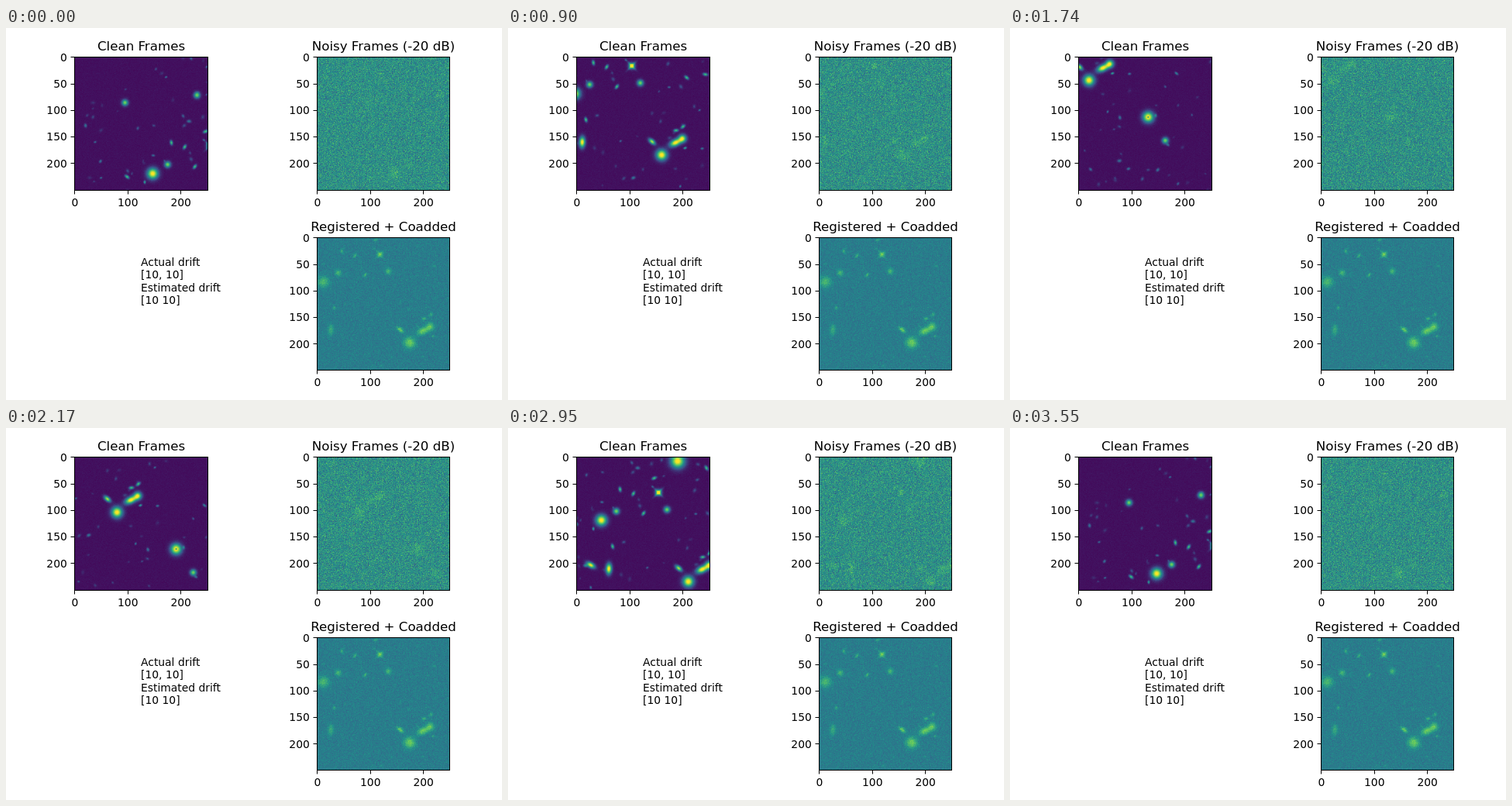
An HTML page with a canvas for the animation above (3.61 s loop, 640 by 480 pixels).

```html
<!DOCTYPE html>
<html lang="en">
<head>
<meta charset="utf-8">
<title>Drift registration</title>
<style>
  html, body { margin: 0; width: 100%; height: 100%; overflow: hidden; background: #fff; }
  canvas { display: block; }
</style>
</head>
<body>
<canvas id="stage" width="640" height="480"></canvas>
<script>
const ctx = document.getElementById('stage').getContext('2d');
const VIEW = 250, DRIFT = 10, STEPS = 30, WORLD = VIEW + DRIFT * (STEPS - 1);
const STEP_MS = 60, TURN_MS = 1810, LOOP_MS = 3610;

// Viridis as a 256-entry lookup table
const stops = ['#440154', '#3b528b', '#21918c', '#5ec962', '#fde725'];
const ramp = document.createElement('canvas').getContext('2d');
const gradient = ramp.createLinearGradient(0, 0, 256, 0);
stops.forEach((color, i) => gradient.addColorStop(i / 4, color));
ramp.fillStyle = gradient;
ramp.fillRect(0, 0, 256, 1);
const palette = ramp.getImageData(0, 0, 256, 1).data;

function seeded(seed) {
  let s = seed * 7919;
  return () => {
    s = s + 0x6D2B79F5 | 0;
    let t = Math.imul(s ^ s >>> 15, 1 | s);
    t = t + Math.imul(t ^ t >>> 7, 61 | t) ^ t;
    return ((t ^ t >>> 14) >>> 0) / 2 ** 32;
  };
}
const gauss = rnd => (rnd() + rnd() + rnd() - 1.5) * 2;

// Sky brightness over the whole area the camera drifts across
const sky = new Float32Array(WORLD * WORLD);

function blob(cx, cy, long, short, degrees, amp) {
  const a = degrees * Math.PI / 180, c = Math.cos(a), s = Math.sin(a), reach = Math.ceil(long * 3);
  for (let y = Math.max(0, cy - reach); y <= Math.min(WORLD - 1, cy + reach); y++)
    for (let x = Math.max(0, cx - reach); x <= Math.min(WORLD - 1, cx + reach); x++) {
      const dx = x - cx, dy = y - cy;
      const u = (dx * c + dy * s) / long, v = (dy * c - dx * s) / short;
      sky[y * WORLD + x] += amp * Math.exp(-(u * u + v * v) / 2);
    }
}

// x, y, radius and, for long galaxies, the tilt in degrees
const galaxies = [
  [146, 218, 7], [94, 85, 4], [229, 71, 4], [206, 168, 3], [131, 234, 2],
  [174, 201, 4], [181, 160, 3], [225, 205, 3], [245, 139, 3], [98, 224, 3],
  [289, 107, 9], [253, 166, 4], [269, 198, 4], [343, 120, 3], [167, 267, 3],
  [126, 302, 6, 30], [160, 309, 7, 92], [291, 308, 5, 40], [309, 333, 7],
  [335, 310, 8, -25], [348, 302, 5], [336, 287, 3], [349, 280, 3],
  [391, 182, 3], [356, 188, 3], [353, 320, 2], [420, 402, 7], [452, 446, 4]
];
for (const [x, y, r, tilt] of galaxies) {
  const round = r > 3 && tilt === undefined;
  blob(x, y, r, round ? r : r / 2 + 0.3, tilt ?? y * 5, Math.min(1, 0.35 + r / 10));
}
// Diffraction spikes of the bright star
for (const angle of [45, -45]) blob(253, 166, 7, 1.5, angle, 0.35);
// Saturated core
blob(420, 402, 1, 1, 0, -0.6);

const scatter = seeded(5);
for (let i = 0; i < 180; i++) {
  const r = 1 + scatter();
  blob(Math.floor(scatter() * WORLD), Math.floor(scatter() * WORLD),
    r * 1.4, r, scatter() * 180, 0.08 + 0.3 * scatter() ** 2);
}
const grainRnd = seeded(3);
const grain = sky.map(() => 0.045 + 0.013 * gauss(grainRnd));

const tile = document.createElement('canvas');
tile.width = tile.height = VIEW;
const tileCtx = tile.getContext('2d');
const pixels = tileCtx.createImageData(VIEW, VIEW);

function drawSky(box, offset, valueAt) {
  for (let y = 0, p = 0; y < VIEW; y++)
    for (let x = 0; x < VIEW; x++, p += 4) {
      const wx = x + offset, wy = y + offset, v = valueAt(wy * WORLD + wx, wx, wy);
      const q = 4 * Math.max(0, Math.min(255, Math.round(v * 255)));
      for (let j = 0; j < 4; j++) pixels.data[p + j] = palette[q + j];
    }
  tileCtx.putImageData(pixels, 0, 0);
  ctx.drawImage(tile, box.x, box.y, box.w, box.h);
  ctx.strokeRect(box.x, box.y, box.w, box.h);
}

function text(str, x, y, align = 'left', size = 13.89) {
  ctx.font = `${size}px "DejaVu Sans", sans-serif`;
  ctx.textAlign = align;
  ctx.fillText(str, x, y);
}

function line(x1, y1, x2, y2) {
  ctx.beginPath();
  ctx.moveTo(x1, y1);
  ctx.lineTo(x2, y2);
  ctx.stroke();
}

function drawAxes({ x, y, w, h, title }) {
  const bottom = y + h, snap = v => Math.floor(v) + 0.5;
  text(title, x + w / 2, y - 8.5, 'center', 16.67);
  for (let v = 0; v <= 200; v += 50) {
    const ty = y + 0.34 + v * 0.684;
    line(x - 5, snap(ty), x, snap(ty));
    text(v, x - 9.7, Math.round(ty + 5), 'right');
    if (v % 100) continue;
    const tx = x + 0.34 + v * 0.684;
    line(snap(tx), bottom, snap(tx), bottom + 5);
    text(v, tx, bottom + 20.5, 'center');
  }
}

const clean = { x: 88.5, y: 37.5, w: 172, h: 172, title: 'Clean Frames' };
const noisy = { ...clean, x: 401.5, w: 171, title: 'Noisy Frames (-20 dB)' };
const coadded = { ...noisy, y: 270.5, h: 171, title: 'Registered + Coadded' };

// Share of the steps in which a point lies inside the moving view
function coverage(x, y) {
  const first = Math.max(0, (Math.max(x, y) - VIEW) / DRIFT);
  const last = Math.min(STEPS - 1, Math.min(x, y) / DRIFT);
  return Math.max(0, last - first + 1) / STEPS;
}

function drawStep(k) {
  const rnd = seeded(k + 100);
  drawSky(clean, k * DRIFT, i => grain[i] + sky[i]);
  drawSky(noisy, k * DRIFT, i => 0.5 + 0.1 * sky[i] + 0.11 * gauss(rnd));
}

ctx.fillStyle = '#fff';
ctx.fillRect(0, 0, 640, 480);
ctx.fillStyle = ctx.strokeStyle = '#000';
[clean, noisy, coadded].forEach(drawAxes);
['Actual drift', '[10, 10]', 'Estimated drift', '[10 10]']
  .forEach((str, i) => text(str, 174, Math.round(307 + i * 16.3)));
const stackRnd = seeded(9);
drawSky(coadded, 135, (i, x, y) => 0.42 + 0.5 * sky[i] * coverage(x, y) + 0.045 * gauss(stackRnd));

let shown = -1;
function tick() {
  const t = performance.now() % LOOP_MS;
  const k = t < TURN_MS
    ? Math.min(STEPS - 1, Math.floor(t / STEP_MS))
    : Math.max(0, STEPS - 1 - Math.floor((t - TURN_MS) / STEP_MS));
  if (k !== shown) drawStep(shown = k);
  requestAnimationFrame(tick);
}
tick();
</script>
</body>
</html>
```
